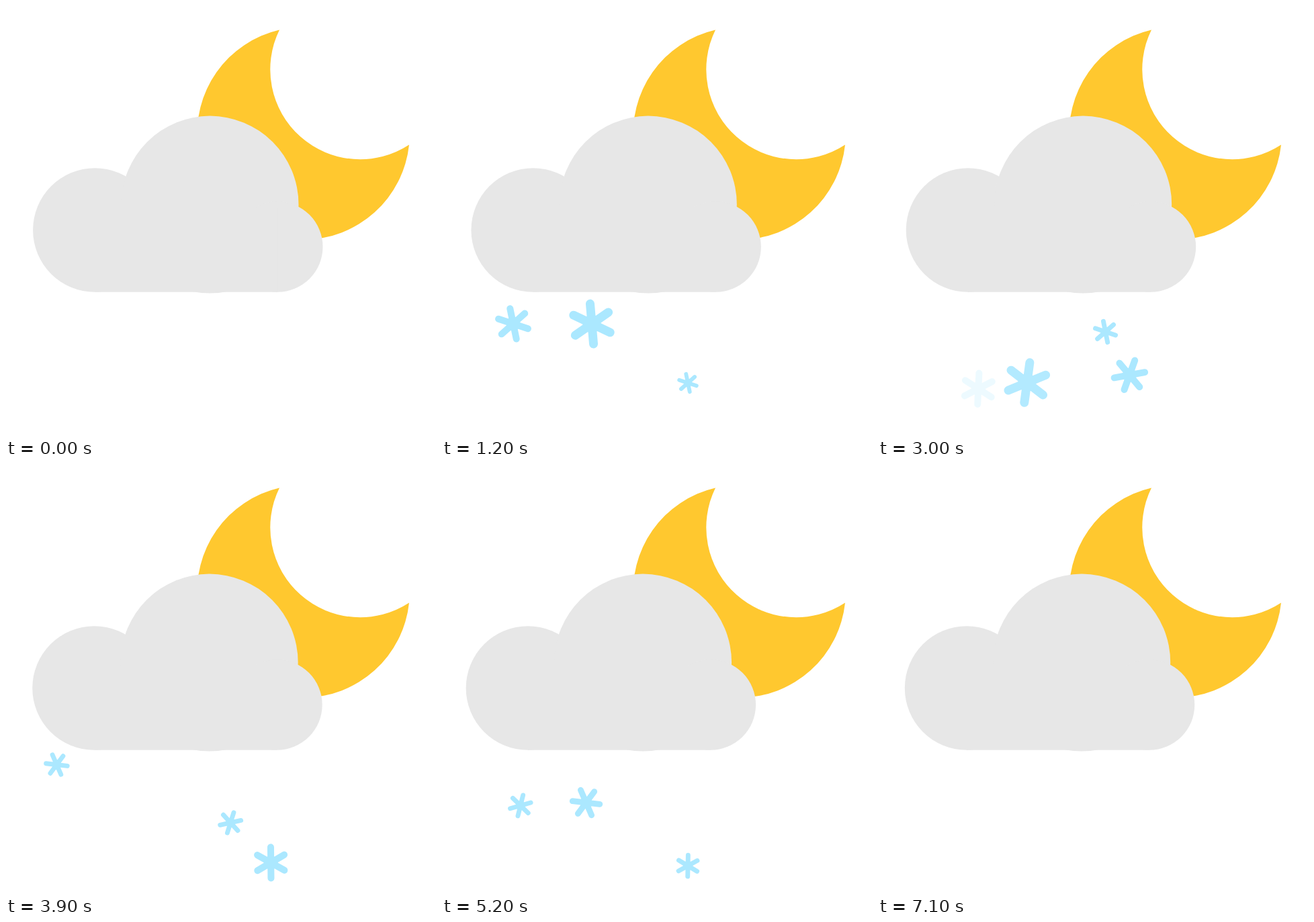
An HTML page that plays this animation: 640x640 px, repeating every 7.2 s.

```html
<!DOCTYPE html>
<html lang="en">
<head>
<meta charset="utf-8">
<title>Snowy night</title>
<style>
  html, body { margin: 0; height: 100%; overflow: hidden; background: #fff; }
  svg { display: block; width: 100%; height: 100%; }
</style>
</head>
<body>
<svg viewBox="0 0 640 640">
  <defs>
    <g id="flake">
      <path d="M-30 0H30M-15 -26L15 26M15 -26L-15 26" stroke="#abe8ff" stroke-width="13" stroke-linecap="round"/>
      <circle r="13.5" fill="#abe8ff"/>
    </g>
  </defs>
  <path fill="#ffc82f" d="M407 35.5A133.7 133.7 0 0 0 600 206.5A158.2 158.2 0 1 1 407 35.5Z"/>
  <g id="snow"></g>
  <g id="cloud" fill="#e7e7e7">
    <circle cx="132.3" cy="333.5" r="92.2"/>
    <circle cx="303.5" cy="295.6" r="132"/>
    <circle cx="404.2" cy="358.4" r="67.3"/>
    <rect x="132.3" y="300" width="271.9" height="125.7"/>
  </g>
</svg>
<script>
const LOOP = 7200, STEP = 100, FADE_IN = 400, SWAY = 5;
const NS = 'http://www.w3.org/2000/svg';
const snow = document.getElementById('snow');
const cloud = document.getElementById('cloud');

const leftDrift = 'M50 429C69 443 94 460 106 473C114 482 113.5 497.5 117 509C122 526 139 549.5 149 569L157 584.5';

// Flakes glide along their path at constant speed (px/s) and turn with it.
const flakes = [
  { scale: .77, start: 0, end: 3160, fadeOut: 800, speed: 59.4, d: leftDrift },
  { scale: .45, start: 0, end: 1930, fadeOut: 0, speed: 59.4, d: leftDrift, dx: 260, dy: 88 },
  { scale: 1, start: 560, end: 3720, fadeOut: 800, speed: 50,
    d: 'M237.5 444.5L223 473C217.7 485 214.4 499 213.5 512C212.3 529 215.5 545.3 222 561C227 573 233 583 239 593' },
  { scale: .77, start: 1350, end: 4500, fadeOut: 0, speed: 54,
    d: 'M394.5 464C389 475 384 485.5 380.5 496C375 512 371.3 533.3 374.5 550C377.5 565 386.3 580.2 394 593L414 627' },
  { scale: .53, start: 2350, end: 5550, fadeOut: 0, speed: 55.3,
    d: 'M353 452C347 463 342 474.5 338.5 485C333.6 499.2 330.9 518.3 334 533C339 556.5 354.4 577 366 598L378 620' },
  { scale: .53, start: 3370, end: 6530, fadeOut: 800, speed: 59.4, d: leftDrift },
  { scale: .68, start: 3950, end: 6800, fadeOut: 600, speed: 50,
    d: 'M237 446C226 468 216.5 487 214.5 504C212 528 209 545 211 565C212 575 215 583 219 591' },
];

for (const flake of flakes) {
  flake.path = document.createElementNS(NS, 'path');
  flake.path.setAttribute('d', flake.d);
  flake.node = snow.appendChild(document.createElementNS(NS, 'use'));
  flake.node.setAttribute('href', '#flake');
}

const clamp = v => Math.max(0, Math.min(1, v));

function drawFlake({ node, path, scale, start, end, fadeOut, speed, dx = 0, dy = 0 }, t) {
  const visible = t >= start && t < end;
  node.style.display = visible ? '' : 'none';
  if (!visible) return;
  const dist = (t - start) / 1000 * speed;
  const p = path.getPointAtLength(dist);
  const a = path.getPointAtLength(Math.max(0, dist - 1));
  const b = path.getPointAtLength(dist + 1);
  const heading = Math.atan2(b.y - a.y, b.x - a.x) * 180 / Math.PI;
  const out = fadeOut ? clamp((end - t) / fadeOut) : 1;
  node.setAttribute('opacity', Math.min(clamp((t - start) / FADE_IN), out));
  node.setAttribute('transform',
    `translate(${p.x + dx} ${p.y + dy}) rotate(${heading + 30}) scale(${scale})`);
}

function draw() {
  const t = Math.floor(performance.now() % LOOP / STEP) * STEP;
  // Triangle wave: right, back, left, back.
  const phase = (t / LOOP + .25) % 1;
  const x = SWAY * (1 - 4 * Math.abs(phase - .5));
  cloud.setAttribute('transform', `translate(${x} 0)`);
  flakes.forEach(flake => drawFlake(flake, t));
  requestAnimationFrame(draw);
}
draw();
</script>
</body>
</html>
```
